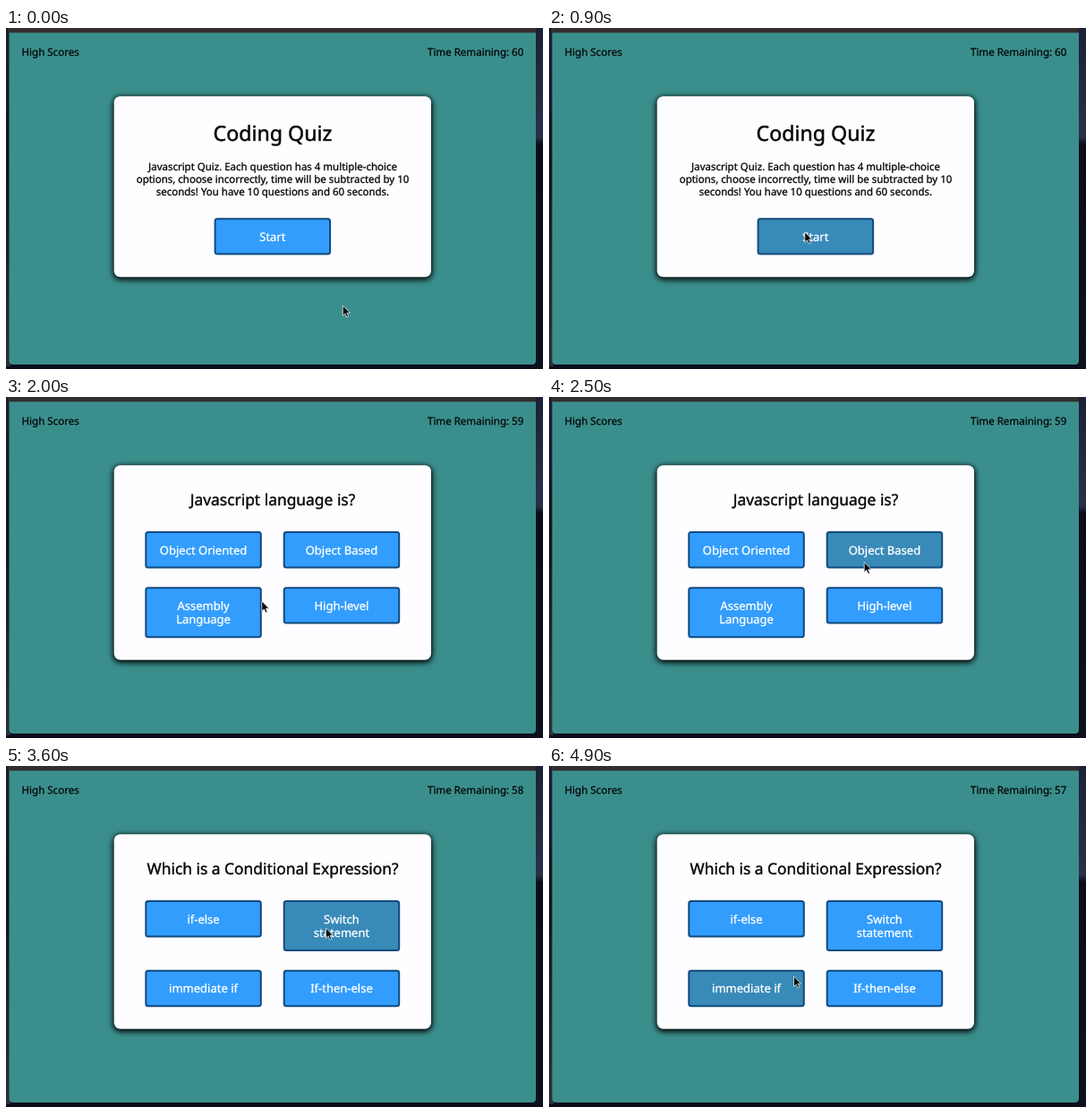
Write an HTML page that moves like this. It is 600 px wide and 381 px high and loops after 5000 ms.

```html
<!DOCTYPE html>
<html lang="en">
<head>
<meta charset="utf-8">
<title>Coding Quiz</title>
<style>
html, body { margin: 0; width: 100%; height: 100%; overflow: hidden; background: #0b0e1a; }
svg { display: block; }
text { font-family: "Noto Sans", "Open Sans", sans-serif; font-size: 11.55px; fill: #050808;
  stroke: #050808; stroke-width: .3px; stroke-linejoin: round; text-rendering: geometricPrecision; }
.mid text { text-anchor: middle; }
.card { fill: #fefdff; filter: drop-shadow(0 2px 3.8px #000) drop-shadow(0 0 1.5px rgba(0,0,0,.5)); }
text.h1 { font-size: 23.2px; stroke-width: .5px; }
text.h2 { font-size: 17.4px; stroke-width: .4px; }
text.p { font-size: 11.48px; }
.btn rect { fill: #329dfd; stroke: #114a7c; stroke-width: 2px; }
.btn text { font-size: 13px; fill: #fff; stroke: #fff; }
.btn.hover rect { fill: #388ab8; }
.btn.right rect { fill: #3f8e0a; stroke: #235c08; }
.btn.right text { fill: #e9f1e4; stroke: #e9f1e4; }
</style>
</head>
<body>
<svg id="stage" width="600" height="381" viewBox="0 0 600 381">
  <defs>
    <linearGradient id="left" x1="0" y1="0" x2="0" y2="1">
      <stop offset="0" stop-color="#1c1f2e"/>
      <stop offset=".4" stop-color="#11131f"/>
      <stop offset="1" stop-color="#2c2f39"/>
    </linearGradient>
    <linearGradient id="right" x1="0" y1="0" x2="0" y2="1">
      <stop offset="0" stop-color="#1b2138"/>
      <stop offset=".32" stop-color="#2a3049"/>
      <stop offset=".34" stop-color="#0b0e1a"/>
      <stop offset="1" stop-color="#0d101d"/>
    </linearGradient>
  </defs>
  <rect width="600" height="381" fill="#0b0e1a"/>
  <rect width="5" height="378" fill="url(#left)"/>
  <rect x="590" width="10" height="381" fill="url(#right)"/>
  <path d="M3.5 0V371.5Q3.5 376 8 376H587.5Q592 376 592 371.5V0Z" fill="#3a8f8d"/>
  <rect x="3.5" width="588.5" height="5.3" fill="#332d2c"/>
  <text x="17.5" y="30.8">High Scores</text>
  <text id="timer" x="578.3" y="30.8" text-anchor="end">Time Remaining: 60</text>
  <g id="scenes" class="mid"></g>
  <path id="cursor" d="M0 0V11.4L2.6 9.1L4.4 13L6.3 12.2L4.6 8.3H8Z" fill="#0a0a0a" stroke="#e8e8e8" stroke-width=".8" stroke-linejoin="round"/>
</svg>
<script>
const LOOP = 5000, STEP = 100, MID = 298;
const $ = id => document.getElementById(id);

function add(parent, tag, attrs, content) {
  const el = document.createElementNS("http://www.w3.org/2000/svg", tag);
  for (const k in attrs) el.setAttribute(k, attrs[k]);
  if (content) el.textContent = content;
  return parent.appendChild(el);
}

function label(parent, x, y, content, cls = "") {
  add(parent, "text", { x, y, class: cls }, content);
}

function button(parent, x, y, ...lines) {
  const w = 130.5, h = lines.length > 1 ? 57 : 41.4;
  const el = add(parent, "g", { class: "btn" });
  add(el, "rect", { x: x + 1, y: y + 1, width: w - 2, height: h - 2, rx: 2.5 });
  lines.forEach((s, i) => label(el, x + w / 2, y + 25.5 + i * 15.6, s));
  return { el, x, y, w, h };
}

function scene(cardHeight) {
  const g = add($("scenes"), "g", {});
  add(g, "rect", { class: "card", x: 120.7, y: 76.3, width: 354.3, height: cardHeight, rx: 7 });
  return g;
}

function question(title, ...buttons) {
  const g = scene(217.5);
  label(g, MID, 120.8, title, "h2");
  return { g, buttons: buttons.map(b => button(g, ...b)) };
}

function intro() {
  const g = scene(202);
  label(g, MID, 126.2, "Coding Quiz", "h1");
  ["Javascript Quiz. Each question has 4 multiple-choice",
   "options, choose incorrectly, time will be subtracted by 10",
   "seconds! You have 10 questions and 60 seconds."
  ].forEach((s, i) => label(g, MID, 158.6 + i * 14.1, s, "p"));
  return { g, buttons: [button(g, 232.6, 212.2, "Start")] };
}

const L = 155.3, R = 309.7;
const scenes = [
  intro(),
  question("Javascript language is?",
    [L, 150, "Object Oriented"], [R, 150, "Object Based"],
    [L, 212.2, "Assembly", "Language"], [R, 212.2, "High-level"]),
  question("Which is a Conditional Expression?",
    [L, 150, "if-else"], [R, 150, "Switch", "statement"],
    [L, 227.8, "immediate if"], [R, 227.8, "If-then-else"])
];

// Pointer moves: start, end, from x, y, to x, y
const moves = [
  [100, 700, 376.3, 310, 285.8, 228],
  [2000, 2600, 285.8, 228, 357.5, 181],
  [4400, 4900, 357.5, 181, 273.5, 235]
];

function pointer(t) {
  const [a, b, x0, y0, x1, y1] = moves.filter(m => t >= m[0]).pop() || moves[0];
  const p = Math.min(1, Math.max(0, (t - a) / (b - a)));
  const e = p * p * (3 - 2 * p);
  return [x0 + (x1 - x0) * e, y0 + (y1 - y0) * e];
}

function draw(t) {
  const [px, py] = pointer(t);
  const now = t < 1000 ? 0 : t < 3300 ? 1 : 2;
  $("cursor").setAttribute("transform", `translate(${px} ${py})`);
  $("timer").textContent = "Time Remaining: " + (60 - Math.max(0, Math.floor(t / 1000) - 1));
  scenes.forEach((s, i) => {
    s.g.style.display = i === now ? "" : "none";
    s.buttons.forEach((b, j) => {
      const over = px >= b.x && px < b.x + b.w && py >= b.y && py < b.y + b.h;
      const right = i === 1 && j === 1 && t >= 2800;
      b.el.setAttribute("class", "btn" + (right ? " right" : over ? " hover" : ""));
    });
  });
}

const start = performance.now();
function tick() {
  const t = (performance.now() - start) % LOOP;
  draw(Math.floor(t / STEP) * STEP);
  requestAnimationFrame(tick);
}
tick();
</script>
</body>
</html>
```
